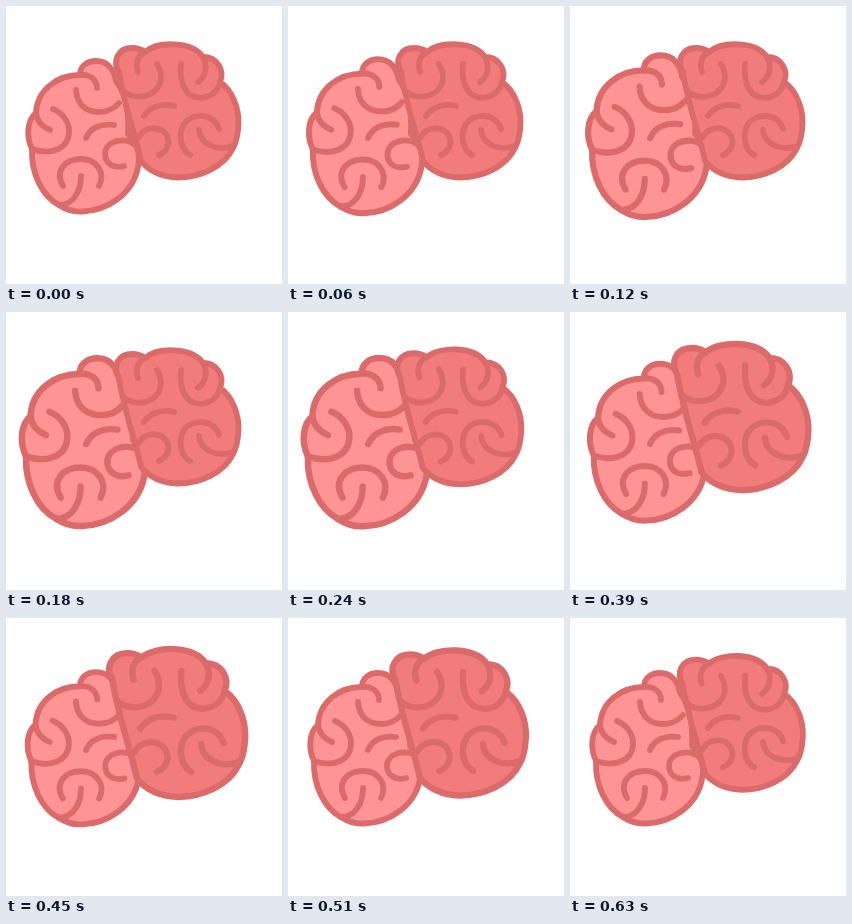
Recreate the animation shown at these times as an HTML page with a canvas. Size 276 by 278 pixels, loop 0.66 s.

```html
<!DOCTYPE html>
<html>
<head>
<meta charset="utf-8">
<style>
html, body { margin: 0; width: 100%; height: 100%; overflow: hidden; background: #fff; }
canvas { display: block; }
</style>
</head>
<body>
<canvas id="stage" width="276" height="278"></canvas>
<script>
const ctx = document.getElementById('stage').getContext('2d');
const LOOP = 660, STEP = 30, LINE = '#db6b6b';

// Each lobe swells about its own centre: start, peak and end in ms.
const lobes = [
  {
    fill: '#ff9494', x: 78, y: 131, grow: 0.12, start: 0, peak: 210, end: 510,
    outline: new Path2D('M74 69 C74 60 81 55 90 55 C101 55 108 63 110 75 C120 88 123 108 122 128' +
      'C131 136 135 150 132 161 C127 188 101 205 76 205.5 C67 206 59 203 53 199' +
      'C36 190 25 167 26 143 C20 131 21 114 30 107 C31 84 51 69 74 69Z'),
    folds: new Path2D('M74 69 C83 68 91 73 91 82' +
      'M70 84 C71 100 82 106 93 106 C101 106 108 103 113 97' +
      'M30 107 C31 116 37 121 44 124' +
      'M47 103 C57 107 64 117 63 127 C62 142 46 150 26 143' +
      'M80 132 C84 122 95 117 108 119' +
      'M129 139 C118 130 99 135 99 148 C99 157 107 163 118 160' +
      'M57 180 C48 164 60 153 75 153 C90 153 100 166 93 180' +
      'M75 170 C75 184 68 199 53 199')
  },
  {
    fill: '#f27c7c', x: 172, y: 104, grow: 0.11, start: 180, peak: 450, end: 660,
    outline: new Path2D('M113 66 C106 55 112 42 126 42 C131 42 135 43 139 46 C152 35 186 35 197 51' +
      'C211 51 219 64 214 76 C227 85 233 103 232.5 118 C232 128 231 135 227 142' +
      'C218 161 194 171.5 172 171.5 C156 171 143 165 135 155 C131 135 122 110 118 90 C116 82 114 75 113 66Z'),
    folds: new Path2D('M139 46 C132 49 129 57 132 66' +
      'M117 85 C128 94 145 92 152 81 C157 73 155 64 151 58' +
      'M175 58 C173 78 180 92 195 92 C205 91 212 85 214 76' +
      'M197 51 C202 60 200 70 192 76' +
      'M138 110 C144 101 155 97 168 100' +
      'M133 131 C138 121 153 119 160 128 C165 136 162 145 153 149' +
      'M184 149 C174 143 172 128 178 118 C187 106 208 107 213 123' +
      'M193 124 C194 138 211 146 227 140')
  }
];

const ease = p => (1 - Math.cos(Math.PI * p)) / 2;

function swell({ start, peak, end }, t) {
  if (t <= start || t >= end) return 0;
  return ease(t < peak ? (t - start) / (peak - start) : (end - t) / (end - peak));
}

function drawLobe(lobe, t) {
  const scale = 1 + lobe.grow * swell(lobe, t);
  ctx.save();
  ctx.translate(lobe.x, lobe.y);
  ctx.scale(scale, scale);
  ctx.translate(-lobe.x, -lobe.y);
  ctx.fillStyle = lobe.fill;
  ctx.fill(lobe.outline);
  ctx.stroke(lobe.folds);
  ctx.stroke(lobe.outline);
  ctx.restore();
}

function frame() {
  const t = Math.floor(performance.now() % LOOP / STEP) * STEP;
  ctx.fillStyle = '#fff';
  ctx.fillRect(0, 0, 276, 278);
  ctx.strokeStyle = LINE;
  ctx.lineWidth = 5.8;
  ctx.lineCap = ctx.lineJoin = 'round';
  lobes.forEach(lobe => drawLobe(lobe, t));
  requestAnimationFrame(frame);
}
frame();
</script>
</body>
</html>
```
